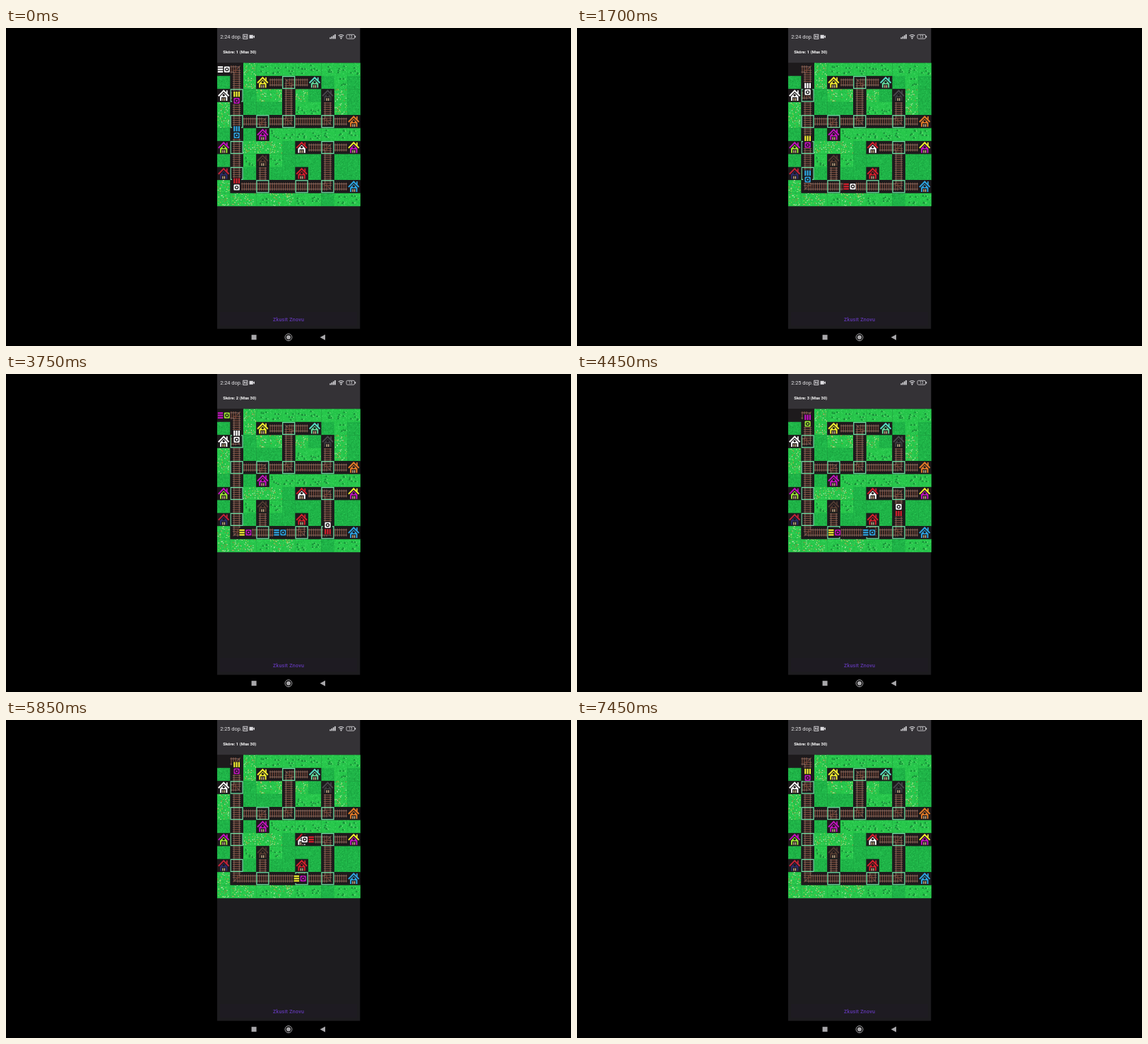
An HTML page with a canvas for the animation above (7.5 s loop, 800x450 px).

```html
<!DOCTYPE html>
<html lang="cs">
<head>
<meta charset="utf-8">
<title>Vláčky</title>
<style>
html, body { margin: 0; width: 100%; height: 100%; overflow: hidden; background: #000; }
canvas, svg { position: absolute; left: 0; top: 0; width: 800px; height: 450px; display: block; }
text { font-family: Roboto, Inter, sans-serif; }
</style>
</head>
<body>
<canvas id="stage" width="800" height="450"></canvas>
<svg viewBox="0 0 800 450">
  <text id="clock" x="303.2" y="15" font-size="7.45" fill="#e4e3e6">2:24 dop.</text>
  <text id="score" x="307.3" y="36.3" font-size="5.9" font-weight="700" fill="#fff">Skóre: 1 (Max 30)</text>
  <text x="400" y="414.5" font-size="7.1" font-weight="500" letter-spacing=".25" text-anchor="middle" fill="#6238b4">Zkusit Znovu</text>
  <text x="487.8" y="14.1" font-size="5" text-anchor="middle" fill="#dddce0">13</text>
</svg>
<script>
const LOOP = 7500, CELL = 18.41, LEFT = 299, TOP = 49.4, HALF = CELL / 2;
const DARK = '#1d1a1c', MINT = '#70dfa4', TIE = '#75483a', RAIL = '#80675e';
const WHITE = '#ffffff', YELLOW = '#f0ea30', MAGENTA = '#c212be', RED = '#d41f2d',
      BLUE = '#2da3e0', LIME = '#9be234';
const DIRS = { N: [0, -1], E: [1, 0], S: [0, 1], W: [-1, 0] };

// . grass, f flowers, t tufts, # bare ground
const LAND = [
  '##fttttttttt', '.#f#####.t..', '##.ff#f.#f..', 'f#...#tt#f..', 'f###########',
  '.#.#ttttttt.', '##fff.#####.', '.#t#t...#...', '##....#.#...', 'f##########.', 'ffftfftt.tt.'
];
const ROUTES = [
  ['WS', '1,0'],
  ['NS', '1,1 1,3 1,5 1,7 3,8 5,2 5,3 8,3 8,7 8,8'],
  ['NE', '1,9'],
  ['WE', '2,9 4,9 5,9 7,9 9,9 7,6 9,6 2,4 4,4 6,4 7,4 9,4 4,1 6,1']
];
const SWITCHES = [
  ['NW', '1,2 8,9 5,4 8,4'], ['NS', '1,4 1,6 1,8'], ['WE', '3,9'],
  ['SW', '8,6 3,4'], ['SE', '5,1']
];
// column, row, roof, walls
const HOUSES = [
  [3, 1, YELLOW, YELLOW], [7, 1, '#55dcc0', '#62d89a'], [0, 2, WHITE, WHITE],
  [8, 2, '#48474b', '#3c3b3e'], [10, 4, '#e07a28', '#e07a28'], [3, 5, MAGENTA, MAGENTA],
  [0, 6, MAGENTA, LIME], [6, 6, RED, WHITE], [10, 6, YELLOW, MAGENTA],
  [3, 7, '#4f3a31', '#523a2f'], [0, 8, '#c0233a', '#2c2b6a'], [6, 8, RED, RED],
  [10, 9, BLUE, BLUE]
];
const TO_WHITE = [[0, 0], [1, 0], [1, 2], [0, 2]];
const TO_RED = [[0, 0], [1, 0], [1, 9], [6, 9], [6, 8]];
const TO_MIX = [[0, 0], [1, 0], [1, 9], [8, 9], [8, 6], [6, 6]];
const TRAINS = [
  { start: -4.91, path: TO_MIX, car: RED, engine: WHITE, gain: 1 },
  { start: -2.91, path: TO_RED, car: BLUE, engine: BLUE, gain: -1 },
  { start: -1.58, path: TO_RED, car: YELLOW, engine: MAGENTA, gain: -1 },
  { start: 0.45, path: TO_WHITE, car: WHITE, engine: WHITE, gain: 1 },
  { start: 2.44, path: TO_WHITE, car: WHITE, engine: WHITE, gain: 1 },
  { start: 3.75, path: TO_WHITE, car: MAGENTA, engine: LIME, gain: -1 },
  { start: 5.1, path: TO_WHITE, car: YELLOW, engine: MAGENTA, gain: -1 },
  { start: 6.44, path: TO_WHITE, car: YELLOW, engine: MAGENTA, gain: -1 }
];
const SPEED = 2, WAIT = 0.5;

let seed = 7;
const rnd = () => (seed = (seed * 16807) % 2147483647) / 2147483647;
const cx = c => LEFT + (c + 0.5) * CELL;
const cy = r => TOP + (r + 0.5) * CELL;
const cells = s => s.split(' ').map(p => p.split(',').map(Number));

function box(g, color, x, y, w, h) {
  g.fillStyle = color;
  g.fillRect(x, y, w, h);
}

function shape(g, color, pts) {
  g.fillStyle = color;
  g.beginPath();
  pts.forEach(([x, y]) => g.lineTo(x, y));
  g.fill();
}

function disc(g, color, x, y, r) {
  g.fillStyle = color;
  g.beginPath();
  g.arc(x, y, r, 0, 7);
  g.fill();
}

function line(g, color, width, pts) {
  g.strokeStyle = color;
  g.lineWidth = width;
  g.beginPath();
  pts.forEach(([x, y]) => g.lineTo(x, y));
  g.stroke();
}

function grass(g, c, r, kind) {
  const x = LEFT + c * CELL, y = TOP + r * CELL, plain = kind === '.';
  const speck = (color, n, size) => {
    for (let i = 0; i < n; i++)
      box(g, color, x + rnd() * (CELL - size), y + rnd() * (CELL - size), size, size);
  };
  box(g, plain ? '#1fb548' : '#27c74b', x, y, CELL + 0.3, CELL + 0.3);
  speck(plain ? '#1a9f3f' : '#20b044', plain ? 60 : 30, 1);
  speck(plain ? '#2ec957' : '#40d862', 34, 1);
  if (kind === 'f') {
    speck('#c5e6ae', 11, 1.2);
    speck('#b8803c', 7, 1.1);
    speck('#b9cf52', 6, 1.1);
  }
  if (kind === 't') for (let i = 0; i < 5; i++) {
    const a = x + 2.5 + rnd() * 13, b = y + 3 + rnd() * 13;
    shape(g, '#178c38', [[a - 1.6, b + 1.2], [a, b - 1.7], [a + 1.6, b + 1.2]]);
    box(g, '#8fe08a', a + 2, b, 1, 1);
  }
}

function track(g, c, r, route) {
  const x = cx(c), y = cy(r);
  const u = DIRS[route[0]], v = DIRS[route[1]];
  const straight = u[0] + v[0] === 0 && u[1] + v[1] === 0;
  const side = straight ? [u[1], u[0]] : v;
  const at = (p, q, a, b) => [x + p[0] * a + q[0] * b, y + p[1] * a + q[1] * b];
  box(g, DARK, x - HALF, y - HALF, CELL, CELL);
  const tie = (p, q, s, from) =>
    line(g, TIE, 1.4, [at(p, q, s, from), at(p, q, s, 5.6)]);
  if (straight) {
    for (let i = 0; i < 6; i++) tie(u, side, (i - 2.5) * 3.07, -5.6);
  } else {
    for (const s of [1.5, 4.6, 7.7]) {
      tie(u, v, s, -5.6);
      tie(v, u, s, -5.6);
    }
    line(g, TIE, 1.4, [[x, y], at(u, v, -5, -5)]);
  }
  for (const k of [-3.7, 3.7])
    line(g, RAIL, 1, straight
      ? [at(u, side, -HALF, k), at(u, side, HALF, k)]
      : [at(u, v, HALF, k), at(u, v, k, k), at(u, v, k, HALF)]);
}

function junction(g, c, r, route) {
  track(g, c, r, route);
  g.strokeStyle = MINT;
  g.lineWidth = 1.3;
  g.strokeRect(cx(c) - 8.5, cy(r) - 8.5, 17, 17);
}

function house(g, [c, r, roof, wall]) {
  g.save();
  g.translate(cx(c), cy(r));
  box(g, DARK, -HALF, -HALF, CELL, CELL);
  box(g, roof, 3.8, -7.2, 1.7, 4.5);
  shape(g, wall, [[-5.2, 7.6], [-5.2, 1], [0, -4], [5.2, 1], [5.2, 7.6]]);
  line(g, DARK, 1, [[-6, 1.8], [0, -4.2], [6, 1.8]]);
  line(g, roof, 2, [[-7.4, 0.8], [0, -6.8], [7.4, 0.8]]);
  disc(g, DARK, 0, -0.4, 1.7);
  box(g, DARK, -3.2, 2.6, 6.4, 5.2);
  for (const x of [-1.9, 0.6]) box(g, '#d9bd92', x, 3.8, 1.3, 3.8);
  g.restore();
}

function phone(g) {
  box(g, '#000', 0, 0, 800, 450);
  box(g, '#1d1c1f', 299, 0, 202.3, 425.7);
  box(g, '#343236', 299, 0, 202.3, 49.4);
  box(g, '#1e1b22', 303, 402, 194, 19);

  const ink = '#dddce0';
  g.strokeStyle = ink;
  g.lineWidth = 0.9;
  g.strokeRect(335.8, 9.2, 6, 6.2);
  line(g, ink, 0.9, [[337.5, 13.8], [337.5, 10.8], [340.1, 13.8], [340.1, 10.8]]);
  box(g, ink, 344.6, 9.8, 5.2, 5);
  shape(g, ink, [[349.6, 12.3], [352, 10.2], [352, 14.4]]);
  for (let i = 0; i < 4; i++) box(g, ink, 458.3 + i * 2.3, 13.4 - i * 1.5, 1.6, 2 + i * 1.5);
  g.lineWidth = 1.4;
  for (const rad of [3, 5.4]) {
    g.beginPath();
    g.arc(474.5, 15, rad, -2.3, -0.84);
    g.stroke();
  }
  disc(g, ink, 474.5, 14.6, 1.1);
  g.lineWidth = 0.8;
  g.beginPath();
  g.roundRect(482, 9.3, 11.6, 5.9, 1.6);
  g.stroke();
  box(g, ink, 494.1, 11, 1.1, 2.6);

  const key = '#a9a8ab';
  box(g, key, 347.6, 434.2, 7, 7);
  g.strokeStyle = key;
  g.lineWidth = 1;
  g.beginPath();
  g.arc(400, 437.7, 4.9, 0, 7);
  g.stroke();
  disc(g, key, 400, 437.7, 3);
  shape(g, key, [[444.6, 437.7], [452, 433.7], [452, 441.7]]);
}

function scenery() {
  const art = document.createElement('canvas');
  art.width = 800;
  art.height = 450;
  const g = art.getContext('2d');
  phone(g);
  box(g, DARK, LEFT, TOP, CELL * 11, CELL * 11);
  for (let r = 0; r < 11; r++)
    for (let c = 0; c < 11; c++)
      if (LAND[r][c] !== '#') grass(g, c, r, LAND[r][c]);
  for (const [route, list] of ROUTES) cells(list).forEach(([c, r]) => track(g, c, r, route));
  for (const [route, list] of SWITCHES) cells(list).forEach(([c, r]) => junction(g, c, r, route));
  HOUSES.forEach(h => house(g, h));
  return art;
}

// Position and heading after d cells; null once the path is used up
function follow(path, d) {
  for (let i = 1; i < path.length; i++) {
    const [a, b] = path[i - 1], dx = path[i][0] - a, dy = path[i][1] - b;
    const len = Math.abs(dx + dy);
    if (d < len) return [a + dx * d / len, b + dy * d / len, Math.atan2(dy, dx)];
    d -= len;
  }
  return null;
}

function drawTrain(g, train, [c, r, angle]) {
  g.save();
  g.translate(cx(c), cy(r));
  g.rotate(angle);
  box(g, DARK, -9, -6.5, 18, 13);
  for (const y of [-4.4, -1.1, 2.2]) box(g, train.car, -8.4, y, 7.4, 2.2);
  g.fillStyle = train.engine;
  g.beginPath();
  g.roundRect(0.6, -4.1, 8, 8.2, 1.2);
  g.fill();
  disc(g, DARK, 4.6, 0, 2.7);
  disc(g, train.engine, 4.6, 0, 1.3);
  g.restore();
}

const g = document.getElementById('stage').getContext('2d');
const clock = document.getElementById('clock');
const score = document.getElementById('score');
const back = scenery();

function setText(el, s) {
  if (el.textContent !== s) el.textContent = s;
}

function draw(ms) {
  const t = (ms % LOOP) / 1000;
  let points = 1;
  g.drawImage(back, 0, 0);
  junction(g, 6, 9, t < 3.3 ? 'WE' : 'NW');
  g.save();
  g.beginPath();
  g.rect(LEFT, TOP, CELL * 11, CELL * 11);
  g.clip();
  for (const train of TRAINS) {
    if (t < train.start - WAIT) continue;
    const pose = follow(train.path, Math.max(0, t - train.start) * SPEED);
    if (pose) drawTrain(g, train, pose);
    else points += train.gain;
  }
  g.restore();
  setText(clock, t < 4.4 ? '2:24 dop.' : '2:25 dop.');
  setText(score, `Skóre: ${points} (Max 30)`);
}

const begin = performance.now();
function tick() {
  draw(performance.now() - begin);
  requestAnimationFrame(tick);
}
tick();
</script>
</body>
</html>
```
